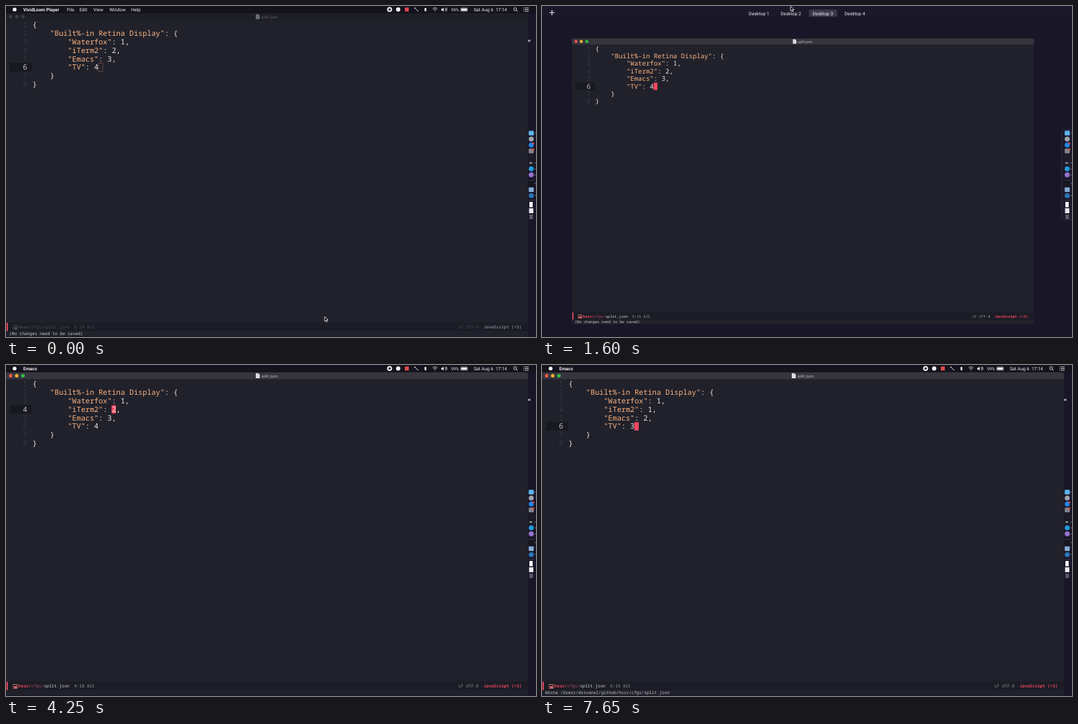
An HTML page for the animation above (8 s loop, 800x500 px).

```html
<!DOCTYPE html>
<html lang="en">
<head>
<meta charset="utf-8">
<title>Editor and desktops</title>
<style>
html, body { margin: 0; width: 100%; height: 100%; overflow: hidden; background: #191627; }
svg { display: block; width: 100%; height: 100%; }
text { text-rendering: geometricPrecision; }
.ui { font: 6.9px Roboto, sans-serif; fill: #f2f2f4; }
.bold { font-weight: 700; }
.code { font: 11.08px "Noto Sans Mono", monospace; fill: #e8e7e4; }
.small { font: 6.38px "Noto Sans Mono", monospace; }
.string { fill: #fcb480; }
.mid { text-anchor: middle; }
.end { text-anchor: end; }
</style>
</head>
<body>
<svg viewBox="0 0 800 500">
  <rect width="800" height="500" fill="#191627"/>
  <g id="menu">
    <rect width="800" height="11.5" fill="#14121c"/>
    <circle cx="13" cy="5.3" r="2.9" fill="#f2f2f4"/>
    <text id="app" class="ui bold" x="26" y="7.8"></text>
    <g id="items" class="ui">
      <text x="92" y="7.8">File</text><text x="111" y="7.8">Edit</text>
      <text x="132" y="7.8">View</text><text x="156" y="7.8">Window</text>
      <text x="189" y="7.8">Help</text>
    </g>
    <g fill="none" stroke="#f2f2f4" stroke-width=".9">
      <circle cx="579" cy="5.3" r="2.8" stroke-width="2"/>
      <path d="M617 3l5 5M616 3.5l2-1M621 8l1.5-1"/>
      <path d="M644 4.4q3.5-3.4 7 0M645.4 6q2.1-2 4.2 0M647 7.8h1"/>
      <path d="M663 3.3q1.4 2 0 4M664.5 2.3q2 3 0 6"/>
      <rect x="686.5" y="3" width="10" height="5" rx="1" stroke-width=".6"/>
      <circle cx="768.5" cy="4.8" r="2.2"/><path d="M770.2 6.5l2.2 2.2"/>
      <path d="M781 3h1m1 0h6M781 5.5h1m1 0h6M781 8h1m1 0h6"/>
    </g>
    <circle cx="592" cy="5.3" r="3.2" fill="#f2f2f4"/>
    <rect x="602" y="2.3" width="6" height="6" fill="#e0464c"/>
    <rect x="631.8" y="3" width="2.6" height="5" fill="#f2f2f4"/>
    <path d="M657 4.3h1.6l2-1.8v6l-2-1.8H657z" fill="#f2f2f4"/>
    <rect x="687.3" y="3.8" width="8.4" height="3.4" fill="#f2f2f4"/>
    <text class="ui" x="672" y="7.7" style="font-size:6.3px">99%</text>
    <text class="ui" x="706" y="7.8">Sat Aug 6&#160; 17:14</text>
    <text class="ui bold" x="786" y="54" style="font-size:5.5px">ns</text>
  </g>
  <g id="window">
    <path d="M0 499V14q0-3 3-3H785q3 0 3 3V499z" fill="#20212b"/>
    <path id="titlebar" d="M0 21.5V14q0-3 3-3H785q3 0 3 3V21.5z"/>
    <g id="lights"><circle cx="7" cy="16.2" r="2.6"/><circle cx="16.2" cy="16.2" r="2.6"/><circle cx="25.6" cy="16.2" r="2.6"/></g>
    <g id="title">
      <path id="doc" d="M377 12.5h4l2 2v5.5h-6z" fill="#dcdce2"/>
      <text class="ui" x="385" y="18.5" style="font-size:6.3px;fill:#b4b4ba">split.json</text>
    </g>
    <rect id="rowMark" x="6" width="33.5" height="12.8" fill="#181920"/>
    <rect id="caret" width="6.65" height="12.6"/>
    <g id="numbers" class="code end"></g>
    <g id="code" class="code"></g>
    <rect y="478.5" width="788" height="12.5" fill="#1b1c25"/>
    <rect x=".8" y="478.5" width="2" height="12.5" fill="#f0465f"/>
    <g id="status" class="small"></g>
    <text id="message" class="small" x="5" y="496.9" fill="#c9c9cb"></text>
  </g>
  <g id="spaces">
    <rect id="shade" width="800" fill="#1b182a"/>
    <path id="plus" d="M-4 0h8M0-4v8" stroke="#f2f2f4" stroke-width="1.2"/>
    <g id="desktops"></g>
  </g>
  <g id="dock">
    <rect id="dockFrame" x="784" y="187" width="20" height="136" rx="3" fill="#1c1a2b" stroke="#34324a" stroke-width=".8"/>
  </g>
  <path id="mouse" d="M0 0V7.2L1.7 5.7 2.8 8.2 4 7.7 2.9 5.2H5.2z" fill="#050505" stroke="#fff" stroke-width=".8"/>
</svg>
<script>
const LOOP = 8000, STEP = 50, CHAR = 6.65, ROW = 12.86;
const $ = id => document.getElementById(id);
const set = (el, attrs) => { for (const k in attrs) el.setAttribute(k, attrs[k]); };
const rect = (x, y, w, h, fill, more = '') =>
  `<rect x="${x}" y="${y}" width="${w}" height="${h}" fill="${fill}" ${more}/>`;
const label = (x, text, fill, cls = '') => `<text x="${x}" y="487.4" fill="${fill}" class="${cls}">${text}</text>`;

// time, window left, window top, scale, overview shown, thumbnails shown
const view = [
  [1000, 0, 11, 1, 0, 0], [1200, 41, 45.6, .896, .9, 0], [1400, 45, 49, .885, 1, 0],
  [1650, 45, 49, .885, 1, 0], [1800, 85, 99, .783, 1, 1], [2950, 85, 99, .783, 1, 1],
  [3050, 26, 38, .934, .6, 1], [3150, 26, 38, .934, .6, 1], [3250, 0, 11, 1, 0, 1]
];
const pointer = [
  [0, 481, 469], [100, 334, 211], [1250, 334, 211], [1550, 375, 0], [1850, 376, 2],
  [2100, 433, 38], [2250, 433, 39], [3150, 433, 39], [3250, 305, 123], [3450, 298, 123]
];
// time, the four values, line, column
const edits = [
  [0, '1234', 6, 15], [3650, '1234', 5, 15], [3750, '1234', 4, 15], [3950, '1234', 4, 16],
  [4150, '1234', 4, 17], [4250, '1234', 4, 18], [4450, '1 34', 4, 18], [4500, '1134', 4, 19],
  [5050, '1134', 5, 19], [5350, '1134', 5, 18], [6100, '11 4', 5, 17], [6150, '1124', 5, 18],
  [6200, '1124', 6, 15], [6450, '112 ', 6, 14], [6500, '1122', 6, 15], [6900, '112 ', 6, 14],
  [7100, '1123', 6, 15]
];
const FOCUS = 300, TYPING = 3650, CHANGED = 4450, WROTE = 7350, CLEAN = 7600;

function tween(table, t) {
  const i = table.findIndex(row => row[0] > t);
  if (i < 1) return table[i ? table.length - 1 : 0].slice(1);
  const a = table[i - 1], b = table[i], p = (t - a[0]) / (b[0] - a[0]);
  return a.slice(1).map((v, k) => v + (b[k + 1] - v) * p);
}

function webPage() {
  let page = rect(-34, 0, 68, 40, '#fbfafc') + rect(-34, 0, 68, 1.6, '#d9d2e4') + rect(-34, 2.6, 30, .7, '#d6d3dd');
  for (let i = 0; i < 10; i++) {
    const heading = i % 4 === 0;
    page += rect(-23, 8 + i * 3.2, heading ? 9 : 14 + i * 7 % 13, heading ? 1.3 : .6, heading ? '#55555e' : '#b9b9c2');
  }
  for (let i = 0; i < 6; i++) page += rect(12, 6 + i * 3.8, 5 + i * 3 % 7, .8, '#b3b4c8');
  return page + rect(12, 29, 12, 1.5, '#6f80cc');
}

function posterWall() {
  const hues = ['#a8612d', '#8e2320', '#57463a', '#c0442a', '#c79a4c', '#5a2226', '#6e4a30'];
  let wall = rect(-34, -1, 68, 42, '#0c0b10') + rect(-32, .6, 9, .8, '#77747c');
  for (let i = 0; i < 12; i++) {
    const x = -32.5 + i % 4 * 16.4, y = 4.5 + Math.floor(i / 4) * 11.8;
    wall += rect(x, y, 15, 9, hues[i * 5 % 7]) + rect(x, y, 15, 2.5, '#1c1416') +
      rect(x + 4, y + 3, 7, 3, hues[(i * 3 + 4) % 7]);
  }
  return wall;
}

const thumbnails = [
  webPage(),
  rect(-34, 0, 68, 40, '#16161b') + rect(-34, 0, 68, 1, '#24242a') + rect(-32, 3, 9, .6, '#44444a'),
  rect(-35, -2.6, 70, 43, '#10121a') + rect(-30, 2, 5, .6, '#4c4640') + rect(-28, 4, 7, .6, '#5c4a3c') +
    rect(-28, 6, 5, .6, '#5c4a3c') + rect(-35.2, -2.9, 70.6, 44, 'none', 'rx="2" stroke="#2f80e8" stroke-width="1.8"'),
  posterWall()
];
const pill = rect(-21, 40.5, 42.5, 11, '#3b394c', 'rx="2.5" id="pill"');
const closeButton = `<g id="close" transform="translate(-34.4 -2.8)"><circle r="5.3" fill="#f1f1f3"/>
  <path d="M-1.9-1.9l3.8 3.8m0-3.8l-3.8 3.8" stroke="#333" stroke-width=".9"/></g>`;
$('desktops').innerHTML = thumbnails.map((art, n) => `<g>
  <g class="thumb">${art}</g>${n === 2 ? pill + closeButton : ''}
  <text class="ui mid" y="48.8">Desktop ${n + 1}</text>
</g>`).join('');

const dot = (y, fill, r = 3.8, x = 792.8) => `<circle cx="${x}" cy="${y}" r="${r}" fill="${fill}"/>`;
const tile = (y, fill) => rect(789, y - 3.5, 7.6, 7, fill, 'rx="1"');
$('dock').innerHTML += tile(192, '#5eb4ee') + dot(201, '#9da3aa') + dot(210, '#2384e6') + tile(219, '#85858b') +
  tile(228, '#1d1c26') + tile(237, '#20202a') + rect(790, 236.5, 4, 1.4, '#c9c9d0') + dot(246, '#2199dc') +
  dot(255, '#9873d0') + tile(268, '#15151d') + tile(277.5, '#82abd0') + dot(286.5, '#2d75b5') +
  rect(790, 296, 5, 8, '#f3f3f3') + rect(789.5, 305.5, 6.5, 7.5, '#e7e9ec') + rect(790, 315, 5.5, 7, '#575862') +
  dot(207.5, '#ef4545', 1.5, 796) + dot(216.5, '#ef4545', 1.5, 796) +
  rect(789, 263, 8, .6, '#4a4858') + rect(789, 293.3, 8, .6, '#4a4858') +
  [192, 237, 246, 255, 268, 286].map(y => dot(y, '#d5d5da', .6, 798.5)).join('');

function drawCode(values) {
  const names = ['Waterfox', 'iTerm2', 'Emacs', 'TV'];
  const rows = [[0, '{'], [4, '"Built%-in Retina Display": {'],
    ...names.map((name, i) => [8, `"${name}": ${values[i].trim()}${i < 3 ? ',' : ''}`]), [4, '}'], [0, '}']];
  $('code').innerHTML = rows.map(([indent, text], i) =>
    `<text x="${40 + indent * CHAR}" y="${32.1 + i * ROW}">${text.replace(/"[^"]*"/, '<tspan class="string">$&</tspan>')}</text>`).join('');
}

function drawStatus(focused, changed, line, column) {
  const shift = changed ? 10 : 0, dim = '#4b4c57';
  const pick = color => focused ? color : dim;
  const icon = `<path d="M11 482.5h6v6h-6z" fill="none" stroke="${pick('#d98a70')}" stroke-width=".8"/>` +
    rect(12.5, 485, 4, 3, pick('#e8606a'));
  const disk = changed ? rect(20.2, 482.3, 6, 6, '#a583d6', 'rx=".8"') + rect(21.4, 483, 3, 1.7, '#1b1c25') + rect(22.2, 486, 1.8, 1.6, '#1b1c25') : '';
  const path = changed ? label(29, 'hssc/cfgs/split.json', '#a583d6') :
    `<text x="19" y="487.4"><tspan class="bold" fill="${pick('#f0465f')}">hssc/</tspan><tspan fill="${pick('#b8506a')}">cfgs/</tspan><tspan fill="${pick('#dedee0')}">split.json</tspan></text>`;
  $('status').innerHTML = icon + disk + path + label(103 + shift, `${line}:${column} All`, pick('#a0a0a7')) +
    label(683, 'LF UTF-8', pick('#94949c')) + label(721, 'JavaScript (+3)', focused ? '#f0465f' : '#7b7c86', 'bold');
}

let lastKey = '';
function drawEditor(t) {
  const [, values, line, column] = edits.filter(e => e[0] <= t).pop();
  const focused = t >= FOCUS, changed = t >= CHANGED && t < CLEAN;
  const message = t < TYPING ? '(No changes need to be saved)' :
    t < WROTE ? '' : 'Wrote /Users/dorvanel/github/hssc/cfgs/split.json';
  const key = [values, line, column, focused, changed, message].join();
  if (key === lastKey) return;
  lastKey = key;
  drawCode(values);
  drawStatus(focused, changed, line, column);
  const top = 21.9 + (line - 1) * ROW;
  set($('rowMark'), { y: top });
  set($('caret'), {
    x: 40 + column * CHAR - .4, y: top + .2, 'stroke-width': .7,
    fill: focused ? '#f0465f' : 'none', stroke: focused ? 'none' : '#8b5358'
  });
  $('numbers').innerHTML = [1, 2, 3, 4, 5, 6, 7, 8].map(n =>
    `<text x="32.2" y="${32.1 + (n - 1) * ROW}" fill="${n === line ? '#c4c4c8' : '#343540'}">${n}</text>`).join('');
  $('message').textContent = message;
  set($('titlebar'), { fill: focused ? '#36353d' : '#1e1e27' });
  set($('title'), { opacity: focused ? 1 : .4 });
  set($('doc'), { opacity: changed ? .5 : 1 });
  [...$('lights').children].forEach((c, i) =>
    set(c, { fill: focused ? ['#f4574f', '#f5b82e', '#2fc443'][i] : '#3a3a43' }));
  $('app').textContent = focused ? 'Emacs' : 'VividLoom Player';
  set($('items'), { visibility: focused ? 'hidden' : 'visible' });
}

function drawView(t) {
  const [left, top, scale, shown, open] = tween(view, t);
  set($('window'), { transform: `translate(${left} ${top - 11 * scale}) scale(${scale})` });
  set($('menu'), { opacity: 1 - shown });
  set($('dockFrame'), { opacity: shown });
  set($('spaces'), { opacity: shown, transform: `translate(0 ${(shown - 1) * (20 + 50 * open)})` });
  set($('shade'), { height: 18 + 51 * open });
  set($('plus'), { transform: `translate(${15 + open} ${10 + 24.6 * open})` });
  const gap = 48.2 - 9 * (1 - shown) * (1 - open) + 35.5 * open;
  [...$('desktops').children].forEach((g, n) => {
    set(g, { transform: `translate(${399.8 + 4.7 * open + (n - 1.5) * gap} ${-35.2 + 51.2 * open})` });
    set(g.querySelector('.thumb'), { opacity: open });
  });
  set($('pill'), { opacity: 1 - open });
  set($('close'), { opacity: t < 3000 ? Math.min(1, Math.max(0, (t - 2350) / 350)) : 0 });
  const [x, y] = tween(pointer, t);
  set($('mouse'), { transform: `translate(${x} ${y})`, visibility: t < TYPING ? 'visible' : 'hidden' });
}

const start = performance.now();
function frame() {
  const t = Math.floor((performance.now() - start) % LOOP / STEP) * STEP;
  drawEditor(t);
  drawView(t);
  requestAnimationFrame(frame);
}
frame();
</script>
</body>
</html>
```
